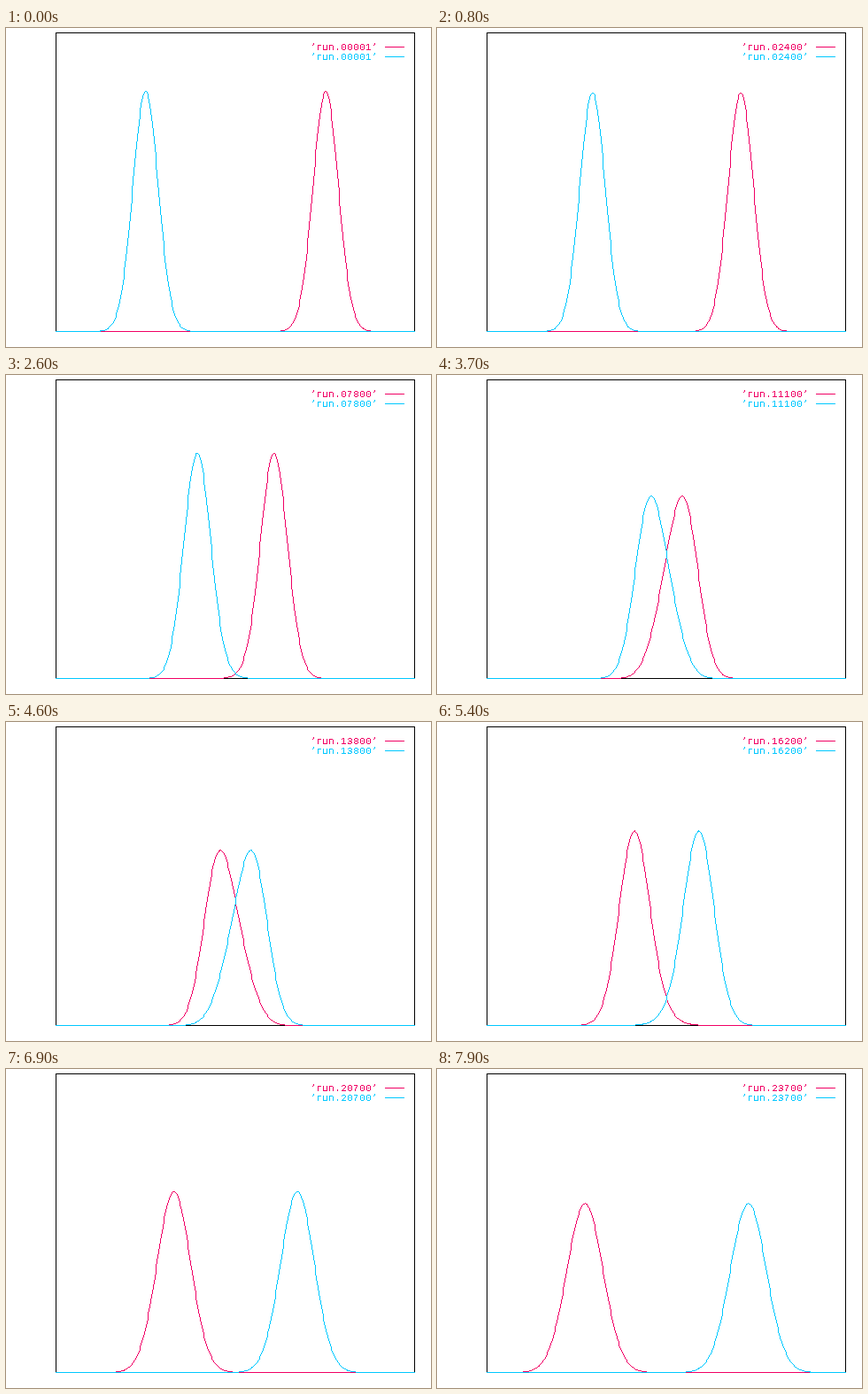
Write a matplotlib script that moves like this. It is 480x360 px and loops after 8 s.

```python
"""Two attracting wave packets pass through each other."""
import numpy as np
import matplotlib.pyplot as plt
from matplotlib.animation import FuncAnimation

W, H, DPI = 480, 360, 100
FRAMES, INTERVAL = 80, 100
LEFT, RIGHT, TOP, BASE = 56, 461, 5, 342
PINK, CYAN = (240, 0, 100), (0, 200, 255)

# Crisp glyphs on whole-pixel advances.
plt.rcParams["text.antialiased"] = False
plt.rcParams["text.hinting_factor"] = 1

# Units: pixels and frames.
MID, START = 258.8, 101.7       # centre line and initial distance from it
SIGMA, PEAK = 14.32, 271        # initial packet width and height
POINTS = 450
CELL = (RIGHT - LEFT) / POINTS  # lattice spacing
KAPPA = 50 * np.pi / (RIGHT - LEFT)
SPEED = 2.25
D = SPEED * CELL / np.sin(KAPPA * CELL)
DEPTH, REACH = 2.026 * D * KAPPA**2, 0.031 * (RIGHT - LEFT)
SPREAD = (D * np.cos(KAPPA * CELL) / (2 * SIGMA)) ** 2

q = (np.arange(1024) - 512) * 0.5
xs = LEFT + CELL * np.arange(POINTS + 1)


def relative_densities(substeps=10):
    """Density of half the packet separation for every frame (split-step)."""
    dt = 1 / substeps
    p = 2 * np.pi * np.fft.fftfreq(q.size, q[1] - q[0])
    kinetic = 2 * D / CELL**2 * (1 - np.cos(CELL * p / 2))
    drift = np.exp(-1j * kinetic * dt)
    kick = np.exp(0.5j * DEPTH * dt * np.exp(-q**2 / (2 * REACH**2)))
    psi = np.exp(-(q - START) ** 2 / (2 * SIGMA**2) - 2j * KAPPA * q)
    out = []
    for _ in range(FRAMES):
        rho = np.abs(psi) ** 2
        out.append(rho / rho.sum())
        for _ in range(substeps):
            psi = kick * np.fft.ifft(drift * np.fft.fft(kick * psi))
    return out


densities = relative_densities()


def packet(k, side):
    """Height of one packet: separation blurred by the free centre of mass."""
    width = np.sqrt((SIGMA**2 + SPREAD * k**2) / 2)
    gap = side * (xs - MID)[:, None] - q[None, :]
    return PEAK * SIGMA / width * (np.exp(-gap**2 / (2 * width**2)) @ densities[k])


def nearest(v):
    return np.floor(v + 0.5).astype(int)


def draw_curve(img, heights, color):
    px, py = nearest(xs), nearest(BASE - heights)
    for x0, y0, x1, y1 in zip(px[:-1], py[:-1], px[1:], py[1:]):
        n = max(abs(x1 - x0), abs(y1 - y0)) + 1
        img[nearest(np.linspace(y0, y1, n)), nearest(np.linspace(x0, x1, n))] = color


def make_background():
    img = np.full((H, W, 3), 255, np.uint8)
    img[[TOP, BASE], LEFT:RIGHT + 1] = 0
    img[TOP:BASE + 1, [LEFT, RIGHT]] = 0
    img[21, 428:450] = PINK
    img[32, 428:450] = CYAN
    return img


background = make_background()
fig = plt.figure(figsize=(W / DPI, H / DPI), dpi=DPI, facecolor="white")
canvas = fig.figimage(background, origin="upper")


def legend(baseline, color):
    return fig.text(344 / W, 1 - baseline / H, "", va="baseline", ha="left",
                    family="Liberation Mono", fontsize=11 * 72 / DPI,
                    color=[c / 255 for c in color])


labels = [legend(25, PINK), legend(36, CYAN)]


def update(k):
    img = background.copy()
    draw_curve(img, packet(k, 1), PINK)
    draw_curve(img, packet(k, -1), CYAN)
    canvas.set_data(img)
    for label in labels:
        label.set_text(f"\u2019run.{max(1, 300 * k):05d}\u2019")
    return [canvas, *labels]


anim = FuncAnimation(fig, update, frames=FRAMES, interval=INTERVAL,
                     repeat=True, repeat_delay=0)
plt.show()
```
